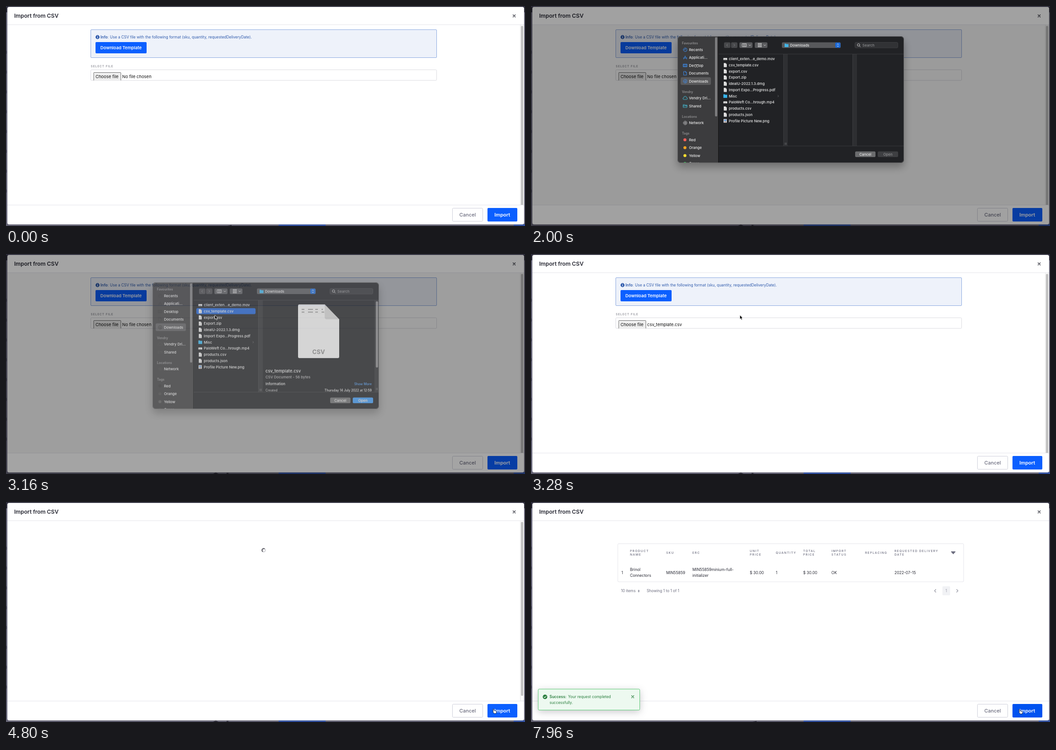
Write an HTML page that moves like this. It is 1148 px wide and 488 px high and loops after 8 s.

```html
<!DOCTYPE html>
<html lang="en">
<head>
<meta charset="utf-8">
<title>Import from CSV</title>
<style>
html, body { margin: 0; width: 100%; height: 100%; overflow: hidden; background: #5f5e70; }
svg { display: block; width: 1148px; height: 488px; }
text { font: 8.4px Inter, "Open Sans", sans-serif; fill: #272833; }
.title { font-size: 12.2px; font-weight: 600; }
.info { fill: #2e5aac; }
.b { font-weight: 600; }
.btn { font-size: 9.55px; font-weight: 600; fill: #fff; }
.big { font-size: 11px; font-weight: 600; fill: #fff; }
.field { font-size: 9.5px; fill: #111; }
.label { font-size: 6.6px; font-weight: 500; fill: #85868f; letter-spacing: .9px; }
.th { font-size: 6.6px; font-weight: 500; fill: #6b6c7e; letter-spacing: 1.35px; }
.td { font-size: 8.5px; }
.muted { fill: #6b6c7e; }
.ok { fill: #287d3c; }
.sheet text { font-size: 8px; font-weight: 500; fill: #f0f0f0; }
.sheet .head { font-size: 7px; font-weight: 600; fill: #929294; }
.sheet .dim { fill: #8f9092; }
.mid { text-anchor: middle; }
.end { text-anchor: end; }
.line { fill: none; stroke-linecap: round; stroke-linejoin: round; }

/* hard switches */
.form, .empty, .chosen, .press, .wait, .result, .full, .files, .pick, .early, .late,
.arrow, .resize, .hand, .hover, .ic, .tags, .veil, .mark1, .mark2 { animation: 8s step-end infinite; }
.form { animation-name: form; }
.full { animation-name: form; }
.wait { animation-name: wait; }
.result { animation-name: result; }
.empty { animation-name: empty; }
.chosen { animation-name: chosen; }
.press { animation-name: press; }
.files { animation-name: files; }
.pick { animation-name: pick; }
.late { animation-name: late; }
.tags { animation-name: tags; }
.ic { animation-name: inactive; }
.arrow { animation-name: arrow; }
.resize { animation-name: resize; }
.hand { animation-name: hand; }
.hover { animation-name: hover; }
.veil { animation-name: veil; }
.mark1 { animation-name: mark1; }
.mark2 { animation-name: mark2; }
@keyframes form { 0% { visibility: visible } 58%, 100% { visibility: hidden } }
@keyframes wait { 0%, 65%, 100% { visibility: hidden } 58% { visibility: visible } }
@keyframes result { 0% { visibility: hidden } 65%, 100% { visibility: visible } }
@keyframes empty { 0% { visibility: visible } 41%, 100% { visibility: hidden } }
@keyframes chosen { 0%, 58%, 100% { visibility: hidden } 41% { visibility: visible } }
@keyframes press { 0%, 24%, 100% { fill: #efefef } 16% { fill: #e3e3e3 } }
@keyframes files { 0% { visibility: visible } 33%, 100% { visibility: hidden } }
@keyframes pick { 0% { visibility: hidden } 33%, 100% { visibility: visible } }
@keyframes late { 0% { visibility: hidden } 24.3%, 100% { visibility: visible } }
@keyframes tags { 0% { transform: translateY(-37.5px) } 24.3%, 100% { transform: none } }
@keyframes inactive { 0% { filter: none } 39%, 100% { filter: grayscale(1) brightness(.4) } }
@keyframes arrow { 0%, 26%, 68.5% { visibility: visible } 22.7%, 54.5%, 93%, 100% { visibility: hidden } }
@keyframes resize { 0%, 26%, 100% { visibility: hidden } 22.7% { visibility: visible } }
@keyframes hand { 0%, 68.5% { visibility: hidden } 54.5%, 93%, 100% { visibility: visible } }
@keyframes hover { 0% { fill: #0b5fff } 95%, 100% { fill: #0053f0 } }
@keyframes veil { 0%, 41%, 100% { opacity: 0 } 22.5% { opacity: .04 } }
@keyframes mark1 { 0%, 96%, 100% { visibility: visible } 14% { visibility: hidden } }
@keyframes mark2 { 0%, 96%, 100% { visibility: hidden } 14% { visibility: visible } }

/* smooth motion */
.shade { animation: shade 8s linear infinite; }
@keyframes shade { 0%, 22.5% { opacity: 0 } 23% { opacity: .03 } 25%, 39% { opacity: .37 } 39.5% { opacity: .36 } 41%, 100% { opacity: 0 } }
.sheet { animation: sheet 8s linear infinite; filter: drop-shadow(0 9px 9px rgba(0,0,0,.3)); }
@keyframes sheet {
  0%, 22.5% { opacity: 0; transform: translate(324px, 47px) }
  23% { opacity: .16; transform: translate(324px, 48px) }
  24% { opacity: .62; transform: translate(324px, 58px) }
  25% { opacity: .98; transform: translate(324px, 67px) }
  25.5%, 39% { opacity: 1; transform: translate(324px, 68px) }
  39.5% { opacity: .68; transform: translate(324px, 63px) }
  41%, 100% { opacity: 0; transform: translate(324px, 47px) }
}
.cursor { animation: move 8s ease-in-out infinite; }
@keyframes move {
  0%, 7.5% { transform: translate(497px, 489px) }
  16.5%, 19.5% { transform: translate(232px, 153px) }
  23% { transform: translate(334px, 144px) }
  25% { transform: translate(366px, 133px) }
  31%, 49.5% { transform: translate(462px, 135.5px) }
  55%, 68% { transform: translate(1077px, 459px) }
  78.5%, 82% { transform: translate(331px, 149px) }
  92% { transform: translate(1086px, 452px) }
  95%, 100% { transform: translate(1079.5px, 460px) }
}
.spin { animation: spin 1s linear infinite; }
@keyframes spin { to { transform: rotate(360deg) } }
</style>
</head>
<body>
<svg viewBox="0 0 1148 488">
  <defs>
    <clipPath id="round"><rect width="501" height="281" rx="7"/></clipPath>
    <clipPath id="input"><rect x="188" y="141" width="765" height="24"/></clipPath>
  </defs>

  <!-- page behind the modal -->
  <rect width="1148" height="488" fill="#666577"/>
  <rect width="1148" height="14" fill="#2e2d3b"/>
  <rect y="485" width="1148" height="3" fill="#5f5e6e"/>
  <path d="M603 484h104v4h-104zM1123 484h25v4h-25z" fill="#33509c"/>
  <path id="edge" class="line" stroke="#3c3b4c"/>
  <path class="mark1" d="M490 488l9-2.500v2.500z" fill="#34333f"/>
  <path class="mark2" d="M458 488l6-4 6 4zM488 488v-3l6 1-4 2z" fill="#34333f"/>

  <!-- modal -->
  <rect x="3" y="2" width="1143" height="482.500" rx="4" fill="#fff"/>
  <path d="M3 41.500h1143M3 441.500h1143" stroke="#e4e4ea"/>
  <text class="title" x="18" y="26.300">Import from CSV</text>
  <path class="line" d="M1121.500 19.500l5 5m0-5l-5 5" stroke="#272833" stroke-width="1.400"/>
  <rect x="987.500" y="448.500" width="67" height="29" rx="2" fill="#fff" stroke="#cdced9"/>
  <text class="big mid" x="1021" y="467" style="fill:#6b6c7e;font-weight:500">Cancel</text>
  <rect class="hover" x="1065" y="448" width="66" height="30" rx="2" fill="#0b5fff"/>
  <text class="big mid" x="1097.700" y="467">Import</text>

  <g class="full">
    <rect x="1137" y="42" width="9" height="399" fill="#fafafa"/>
    <path d="M1137.500 42v399" stroke="#e8e8e8"/>
    <path d="M1139 441V46.500a2.500 2.500 0 0 1 5 0V441z" fill="#c1c1c1"/>
  </g>
  <g class="wait">
    <rect x="1137" y="42" width="9" height="399" fill="#fafafa"/>
    <path d="M1137.500 42v399" stroke="#e8e8e8"/>
    <rect x="1139" y="44" width="5" height="386" rx="2.500" fill="#c1c1c1"/>
    <g transform="translate(570 107)">
      <circle r="3.700" fill="none" stroke="#cfcfd4" stroke-width="2"/>
      <g class="spin"><circle r="3.700" fill="none" stroke="#4d4d55" stroke-width="2" stroke-dasharray="11.600 40" transform="rotate(-168)"/></g>
    </g>
  </g>

  <!-- upload form -->
  <g class="form">
    <rect x="187.500" y="52.500" width="765" height="62" rx="1.500" fill="#eef2fa" stroke="#89a7e0"/>
    <circle cx="202.500" cy="69" r="4.400" fill="#2e5aac"/>
    <path d="M202.500 66.200v1.200m0 1v3.200" stroke="#fff" stroke-width="1.400"/>
    <text class="info" x="209" y="72"><tspan class="b">Info</tspan>:</text>
    <text class="info" x="230" y="72">Use a CSV file with the following format (sku, quantity, requestedDeliveryDate).</text>
    <rect x="198" y="80" width="113" height="25" rx="2" fill="#0b5fff"/>
    <text class="btn mid" x="254.500" y="96.300">Download Template</text>
    <text class="label" x="187.500" y="136.400">SELECT FILE</text>
    <rect x="187.500" y="141.500" width="765" height="23.500" rx="2" fill="#fff" stroke="#dadae0"/>
    <rect class="press" x="194" y="147.500" width="60" height="24" rx="1" fill="#efefef" stroke="#6b6b6b" clip-path="url(#input)"/>
    <text class="field" x="198" y="160">Choose file</text>
  </g>
  <text class="field empty" x="257" y="160">No file chosen</text>
  <text class="field chosen" x="257" y="160">csv_template.csv</text>

  <!-- import result -->
  <g class="result">
    <rect x="192" y="92.500" width="765" height="84.500" rx="2" fill="#fff" stroke="#e4e4ea"/>
    <g id="table"></g>
    <path d="M929 110.500q0-.9 1-.9h8q1 0 1 .9l-5 5.500z" fill="#6b6c7e"/>
    <text class="muted" x="199" y="200">10 items</text>
    <path d="M236.300 197l2-2.300 2 2.300zM236.300 198l2 2.300 2-2.300z" fill="#6b6c7e"/>
    <text class="muted" x="256" y="200">Showing 1 to 1 of 1</text>
    <rect x="910" y="187" width="17" height="20" rx="2" fill="#f1f2f5"/>
    <text class="muted mid" x="918.500" y="200" style="fill:#9a9ba8">1</text>
    <path class="line" d="M895.500 194l-3 3 3 3M941.500 194l3 3-3 3" stroke="#8e8f9c" stroke-width="1.200"/>
    <g style="filter:drop-shadow(0 4px 8px rgba(39,40,51,.25))">
      <rect x="16" y="415" width="224.500" height="46.500" rx="2" fill="#edf9f0" stroke="#5aca75"/>
    </g>
    <circle cx="31" cy="432.300" r="5" fill="#287d3c"/>
    <path class="line" d="M28.800 432.500l1.600 1.600 2.900-3.300" stroke="#fff" stroke-width="1.200"/>
    <text class="ok b" x="41" y="435">Success:</text>
    <text class="ok" x="82" y="435">Your request completed</text>
    <text class="ok" x="41" y="448">successfully.</text>
    <path class="line" d="M222.500 429.500l5 5m0-5l-5 5" stroke="#287d3c" stroke-width="1.200"/>
  </g>

  <rect class="veil" x="3" y="42" width="1143" height="399" opacity="0"/>
  <rect class="shade" y="2" width="1148" height="486" opacity="0"/>

  <!-- file chooser -->
  <g class="sheet">
    <g clip-path="url(#round)">
      <rect width="501" height="281" fill="#1f2023"/>
      <rect width="90" height="281" fill="#3b3b3d"/>
      <path d="M90.500 0v281" stroke="#111"/>
      <rect x="83" y="2" width="5" height="176" rx="2.500" fill="#7c7c7e"/>
      <rect x="7" y="91" width="67" height="17" rx="3" fill="#59595b"/>
      <g id="side"></g>
      <g class="tags" id="tags"></g>

      <rect x="103" y="13.500" width="14" height="12.500" rx="2.500" fill="#46474a"/>
      <rect x="118.500" y="13.500" width="14" height="12.500" rx="2.500" fill="#46474a"/>
      <path class="line" d="M111 17.500l-2.300 2.300 2.300 2.300M124.500 17.500l2.300 2.300-2.300 2.300" stroke="#858688"/>
      <rect x="137" y="13.500" width="29" height="12.500" rx="2.500" fill="#57585b"/>
      <rect x="171" y="13.500" width="28" height="12.500" rx="2.500" fill="#57585b"/>
      <path class="line" d="M143.500 16.500h9v6.500h-9zM146.500 16.500v6.500M149.500 16.500v6.500M158 19l2 2 2-2M191 19l2 2 2-2" stroke="#e4e4e4" stroke-width=".9"/>
      <path d="M178 16.500h8M178 19.700h8M178 23h8" stroke="#e4e4e4" stroke-width="2" stroke-dasharray="2.200 .8"/>
      <rect x="231" y="13.500" width="130" height="12.500" rx="2.500" fill="#57585b"/>
      <path d="M237 16.500h3l1 1h4.500v6.500h-8.500z" fill="#41b7ea"/>
      <text x="249" y="22.700">Downloads</text>
      <rect x="349" y="14" width="11.500" height="11.500" rx="2.500" fill="#1667d9"/>
      <path class="line" d="M353 18.500l1.800-1.800 1.800 1.800M353 21.200l1.800 1.800 1.800-1.800" stroke="#fff"/>
      <rect x="392.500" y="13.500" width="95" height="12.500" rx="2.500" fill="#2f3033" stroke="#47484b" stroke-width=".7"/>
      <path class="line" d="M402.500 21.500l2 2" stroke="#ddd"/>
      <circle cx="400.500" cy="19.300" r="2.700" fill="none" stroke="#ddd"/>
      <text class="dim" x="409" y="22.700">Search</text>

      <path d="M91 39.500h410M91 243.500h410" stroke="#38393c"/>
      <path d="M234 40h10v203h-10z" fill="#2c2d30"/>
      <path d="M234.500 40v203" stroke="#3a3b3e"/>
      <path d="M238 236v5M240.500 236v5" stroke="#77787a" stroke-width=".8"/>
      <g class="files">
        <path d="M387.500 40h9.500v203h-9.500z" fill="#2c2d30"/>
        <path d="M387.500 40v203" stroke="#3a3b3e"/>
      </g>
      <rect class="pick" x="97" y="57.300" width="131" height="13.200" rx="3" fill="#1b5fd2"/>
      <g id="files"></g>
      <path class="line" d="M222 131l1.600 1.800-1.600 1.800" stroke="#77787a" stroke-width=".8"/>

      <g class="pick">
        <path d="M491 40h10v203h-10z" fill="#2c2d30"/>
        <rect x="494" y="42" width="5" height="147" rx="2.500" fill="#858587"/>
        <path d="M495 234v5M497.500 234v5" stroke="#77787a" stroke-width=".8"/>
        <path d="M325 49h56l32 33v83q0 3-3 3h-85q-3 0-3-3V52q0-3 3-3z" fill="#f1f1f1"/>
        <path d="M381 49l32 33h-27q-5 0-5-5z" fill="#d2d2d2"/>
        <path d="M330 60h47M330 66h50" stroke="#777" stroke-width="1.300" stroke-dasharray="6 8 11 5"/>
        <path d="M329 57h51M329 63h52M329 69h52" stroke="#ccc" stroke-width=".5"/>
        <text class="mid" x="367.500" y="158.500" style="font-size:13px;font-weight:700;fill:#868686">CSV</text>
        <text x="250" y="200.400" style="font-size:9.500px">csv_template.csv</text>
        <text x="250" y="213" style="fill:#b5b5b7">CSV Document - 56 bytes</text>
        <text class="b" x="250" y="228">Information</text>
        <text class="end" x="485" y="228" style="font-size:7.200px;fill:#4f9bf0">Show More</text>
        <text x="250" y="241.500" style="font-size:7px;fill:#b5b5b7">Created</text>
        <text class="end" x="485" y="241.500" style="font-size:7px">Thursday 14 July 2022 at 12:59</text>
      </g>

      <rect x="393" y="255.500" width="45" height="12.500" rx="2.500" fill="#6b6c6e"/>
      <text class="mid" x="415.500" y="264.700">Cancel</text>
      <rect x="443" y="255.500" width="45" height="12.500" rx="2.500" fill="#3d3e41"/>
      <rect class="pick" x="443" y="255.500" width="45" height="12.500" rx="2.500" fill="#3d95ee"/>
      <text class="mid dim" x="465.500" y="264.700">Open</text>
      <text class="mid pick" x="465.500" y="264.700">Open</text>
    </g>
    <rect x=".5" y=".5" width="500" height="280" rx="7" fill="none" stroke="#6c6c6e" stroke-width=".8"/>
  </g>

  <!-- pointer -->
  <g class="cursor">
    <path class="arrow" d="M0 0v9.200l2.100-1.900 1.500 3.500 1.700-.8-1.500-3.300h2.800z" fill="#000" stroke="#fff" stroke-width=".8"/>
    <g class="resize">
      <path id="rs" d="M-5 0l3-3v2h4v-2l3 3-3 3v-2h-4v2z" fill="#000" stroke="#fff" stroke-width=".7"/>
    </g>
    <path class="hand" d="M0 .5q1-1 1.800.3l1.200 3 3 .4q2 .4 1.800 2.300l-.8 3.500h-4.200l-2.800-3.200q-.4-1.300 1-1z" fill="#fff" stroke="#111" stroke-width=".8" stroke-linejoin="round"/>
  </g>
</svg>
<script>
const put = (id, parts) => { document.getElementById(id).innerHTML = parts.join(''); };
const text = (x, y, s, cls = '') => `<text class="${cls}" x="${x}" y="${y}">${s}</text>`;
const icon = (y, d, color) =>
  `<g class="ic" transform="translate(17 ${y})"><path class="line" d="${d}" stroke="${color}"/></g>`;

// clipped glyphs at the left edge of the page behind
document.getElementById('edge').setAttribute('d',
  Array.from({ length: 8 }, (_, i) => `M0 ${99 + i * 44}q3 4 0 7`).join(''));

// sidebar
const ring = 'M-4 0a4 4 0 1 0 8 0a4 4 0 1 0-8 0';
const blue = '#3d8ff2', cyan = '#45c3dd';
const places = [
  [30, 'Recents', ring + 'M0-2.500V0H-2', blue],
  [47.3, 'Applicati...', 'M-3.500 3.500L0-3.500 3.500 3.500M-4 1h8', blue],
  [64.8, 'Desktop', 'M-4-3h8v6h-8zM-4 1.500h8M-4-1.500h8', blue],
  [82.3, 'Documents', 'M-3-4h4l2 2v6h-6zM1-4v2h2', blue],
  [99.8, 'Downloads', ring + 'M0-2v4M-1.500.5L0 2 1.500.5', blue],
  [137.2, 'Vendry Dri...', 'M-3 3a2 2 0 0 1 0-4a3 3 0 0 1 6 0a2 2 0 0 1 0 4z', cyan],
  [154.8, 'Shared', 'M-4-3h3l1 1h4v5h-8zM-4-.5h8', cyan]
];
const place = ([y, name, d, color]) => icon(y, d, color) + text(25.5, y + 2.8, name);
put('side', [
  text(10, 18.3, 'Favourites', 'head'),
  text(10, 125.6, 'Vendry', 'head'),
  ...places.map(place),
  '<g class="late">', text(10, 180.8, 'Locations', 'head'),
  place([192.3, 'Network', ring + 'M-4 0h8M0-4v8M-2.500-2.500l5 5M2.500-2.500l-5 5', '#a5a5a7']), '</g>'
]);
const tags = { Red: '#ff5f5a', Orange: '#ffa51f', Yellow: '#ffe02e', Green: '#42d566', Blue: '#3b8dff', Purple: '#c46be8' };
put('tags', [
  text(10, 218.4, 'Tags', 'head'),
  ...Object.entries(tags).map(([name, color], i) => {
    const y = 229.8 + i * 17.5;
    return `<circle class="ic" cx="16.500" cy="${y}" r="3.300" fill="${color}"/>` + text(25.5, y + 2.8, name);
  })
]);

// file list
const sheetIcon = '<path d="M-3-4.500h4l2.500 2.500v6.500h-6.500z" fill="#f2f2f2"/><path d="M1-4.500v2.500h2.500M-1 .5h3M-1 2.500h3" fill="none" stroke="#999" stroke-width=".7"/>';
const clipIcon = '<rect x="-4" y="-2" width="8.500" height="4.500" rx=".5" fill="#e8e8e8"/><path d="M-3 1.200h6" stroke="#777" stroke-width=".8"/>';
const folderIcon = '<path d="M-4-4h3l1 1h4.500v7h-8.500z" fill="#35b4ec"/>';
const photoIcon = '<rect x="-3.500" y="-4" width="7" height="8" fill="#eee"/><rect x="-2.500" y="-3" width="5" height="4" fill="#6d9bd0"/><path d="M-2 3q2-4 4 0z" fill="#a4796a"/>';
const files = ['client_exten...e_demo.mov', 'csv_template.csv', 'export.csv', 'Export.zip', 'ideaIU-2022.1.3.dmg',
  'Import Expo...Progress.pdf', 'Misc', 'PaloWeft Co...hrough.mp4', 'products.csv', 'products.json', 'Profile Picture New.png'];
const special = { 0: clipIcon, 6: folderIcon, 7: clipIcon, 10: photoIcon };
put('files', files.map((name, i) => {
  const y = 50.2 + i * 13.75;
  return `<g transform="translate(105.500 ${y})">${special[i] || sheetIcon}</g>` + text(113.5, y + 2.8, name);
}));

// result table: x, heading lines, cell lines
const columns = [
  [200, '', '1'],
  [219, 'PRODUCT|NAME', 'Brinol|Connectors'],
  [299, 'SKU', 'MIN55859'],
  [357, 'ERC', 'MIN55859minium-full-|initializer'],
  [484, 'UNIT|PRICE', '$ 30.00'],
  [541.5, 'QUANTITY', '1'],
  [602, 'TOTAL|PRICE', '$ 30.00'],
  [664.5, 'IMPORT|STATUS', 'OK'],
  [739, 'REPLACING', ''],
  [804, 'REQUESTED DELIVERY|DATE', '2022-07-15']
];
const stack = (x, mid, gap, s, cls) => {
  const lines = s.split('|');
  return lines.map((l, i) => text(x, mid + (i - (lines.length - 1) / 2) * gap, l, cls)).join('');
};
put('table', columns.map(([x, head, cell]) => stack(x, 115, 7.6, head, 'th') + stack(x, 159.5, 13, cell, 'td')));
</script>
</body>
</html>
```
